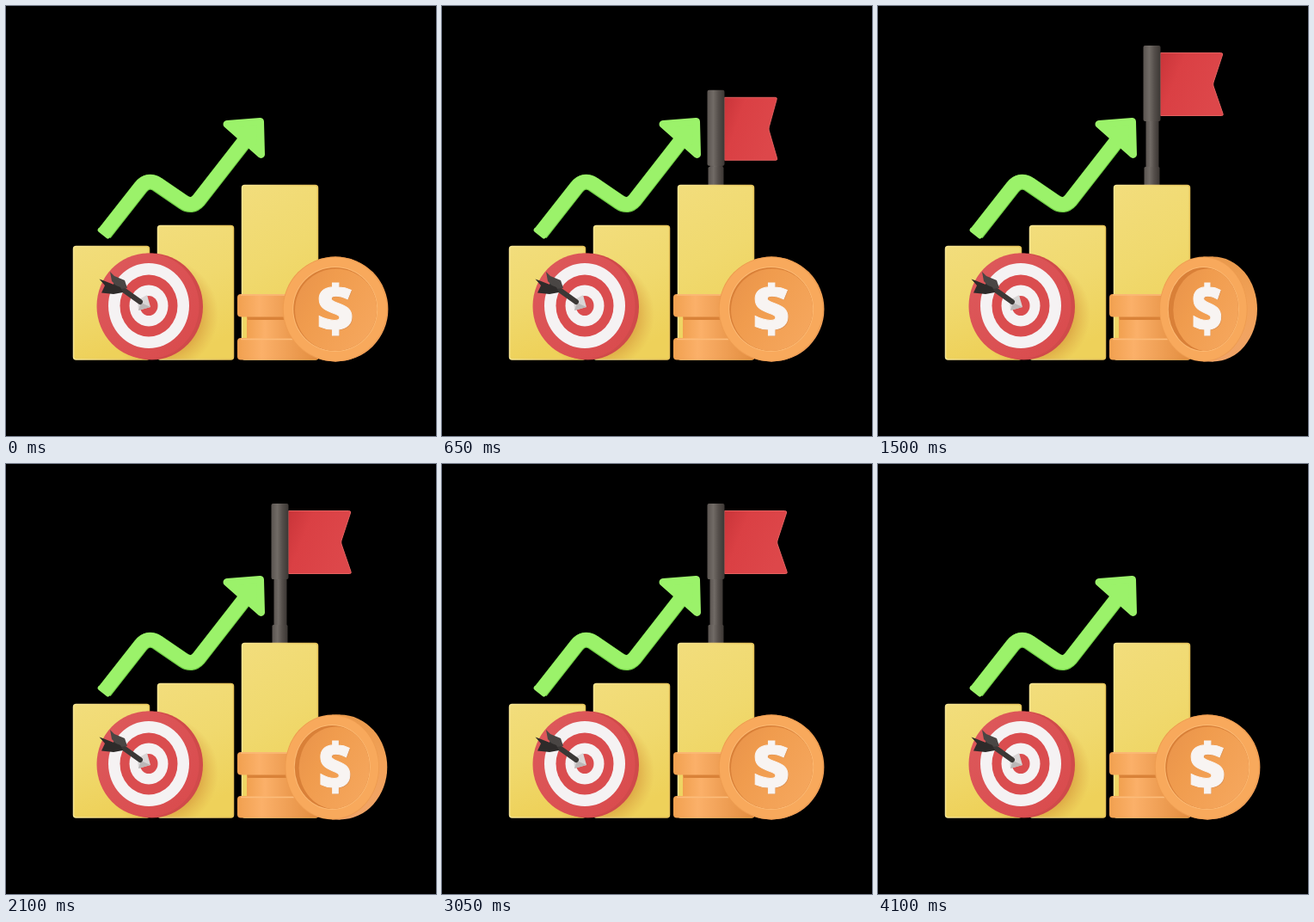
Write an HTML page that moves like this. It is 500x500 px and loops after 4150 ms.

```html
<!DOCTYPE html>
<html lang="en">
<head>
<meta charset="utf-8">
<title>Growth chart</title>
<style>
  html, body { margin: 0; width: 100%; height: 100%; overflow: hidden; background: #000; }
  svg { display: block; width: 100vw; height: 100vh; }
  text { font: 800 74px "Open Sans", "Noto Sans", sans-serif; text-anchor: middle; }
</style>
</head>
<body>
<svg viewBox="0 0 500 500">
  <defs>
    <linearGradient id="bar" x1="0" y1="0" x2=".25" y2="1">
      <stop offset="0" stop-color="#f2dd7c"/><stop offset=".5" stop-color="#f0d96e"/><stop offset="1" stop-color="#eed15a"/>
    </linearGradient>
    <linearGradient id="edge" x1="0" x2="1">
      <stop offset="0" stop-color="#f7e592"/><stop offset="1" stop-color="#e4c158"/>
    </linearGradient>
    <radialGradient id="shade">
      <stop offset=".6" stop-color="#cf8a32" stop-opacity=".75"/><stop offset="1" stop-color="#d9a040" stop-opacity="0"/>
    </radialGradient>
    <linearGradient id="pole" x1="0" x2="1">
      <stop offset="0" stop-color="#5a5450"/><stop offset=".35" stop-color="#716b66"/>
      <stop offset=".65" stop-color="#544e4a"/><stop offset="1" stop-color="#3c3734"/>
    </linearGradient>
    <linearGradient id="cloth" x1="0" x2="1" y2=".4">
      <stop offset="0" stop-color="#c93439"/><stop offset=".35" stop-color="#da4044"/><stop offset="1" stop-color="#dd474a"/>
    </linearGradient>
    <linearGradient id="stack" x1="0" x2="1">
      <stop offset="0" stop-color="#f1a04f"/><stop offset=".3" stop-color="#fbb069"/><stop offset="1" stop-color="#e28c3e"/>
    </linearGradient>
    <linearGradient id="side" x1="0" x2="0" y1="0" y2="1">
      <stop offset="0" stop-color="#e8994c"/><stop offset=".45" stop-color="#f3a258"/><stop offset="1" stop-color="#f0a468"/>
    </linearGradient>
    <linearGradient id="well" x1="0" x2="1" y2=".6">
      <stop offset="0" stop-color="#e8924a"/><stop offset=".4" stop-color="#f09c4e"/><stop offset="1" stop-color="#f5a65c"/>
    </linearGradient>
    <linearGradient id="red" x1="0" x2="1" y2="1">
      <stop offset="0" stop-color="#dd5a5c"/><stop offset="1" stop-color="#d94a4c"/>
    </linearGradient>
    <clipPath id="hole"><circle r="48.500"/></clipPath>
    <clipPath id="walls"><path d="M79 280H167V411H79ZM177 256H265V411H177Z"/></clipPath>
  </defs>

  <g id="mast">
    <rect id="middle" x="311.500" width="15" fill="url(#pole)"/>
    <rect id="base" x="309.500" width="18" rx="1.500" fill="url(#pole)"/>
    <g id="top">
      <path id="flag" d="M0 8.500H70Q73 8.500 72 11L61.500 43Q61 45 61.500 47L72.500 79Q73.500 81.500 71 81.500H0Z" fill="url(#cloth)" stroke="#e2605f"/>
      <rect x="308.500" width="20" height="88" rx="2" fill="url(#pole)"/>
    </g>
  </g>

  <g fill="url(#bar)" stroke="url(#edge)" stroke-width="1.500">
    <rect x="78.500" y="279.500" width="88" height="131.500" rx="3"/>
    <rect x="176.500" y="255.500" width="88" height="155.500" rx="3"/>
    <rect x="274.500" y="208.500" width="88" height="202.500" rx="3"/>
  </g>
  <ellipse cx="181" cy="359" rx="66" ry="66" fill="url(#shade)" clip-path="url(#walls)"/>

  <g stroke-linejoin="round" stroke-linecap="round">
    <path d="M114.500 264.500L156.500 211Q165 200.500 176 207.500L206 228Q216 235 224 226L277 158" fill="none" stroke="#70cf45" stroke-width="18" stroke-linecap="butt"/>
    <path d="M114 264.500L156.500 210.500Q165 200 176 207L206 227.500Q216 234.500 224 225.500L277 157.500" fill="none" stroke="#9bf26a" stroke-width="16.500" stroke-linecap="butt"/>
    <path d="M109 260.500L118.500 268" stroke="#9bf26a" stroke-width="5"/>
    <path d="M257 137.500L295.500 134.500L296.500 172.500Z" fill="#9bf26a" stroke="#9bf26a" stroke-width="9"/>
  </g>

  <g fill="url(#stack)">
    <rect x="280" y="359" width="70" height="30"/>
    <path d="M280 360H350V365H281Z" fill="#d98238"/>
    <rect x="269" y="335" width="85" height="26.500" rx="4"/>
    <rect x="269" y="386" width="95" height="25.500" rx="4"/>
    <path d="M273 336H340M273 387.500H340" stroke="#fcbc7a" stroke-width="1.500"/>
  </g>

  <g>
    <ellipse cx="169.500" cy="349.500" rx="59.500" ry="62" fill="#d04a4a"/>
    <ellipse cx="165" cy="349" rx="59.500" ry="61.500" fill="url(#red)"/>
    <g fill="#f5f2f3">
      <ellipse cx="166" cy="348.500" rx="47" ry="49.500"/>
      <ellipse cx="166" cy="348.500" rx="33.500" ry="36" fill="#da4d4f"/>
      <ellipse cx="166" cy="348.500" rx="22.500" ry="24"/>
      <ellipse cx="166" cy="348.500" rx="10.500" ry="11.500" fill="#da4d4f"/>
    </g>
    <path d="M153 342L164 336L168 350L154 354Z" fill="#d9d6d6"/>
    <path d="M157 345L168 350L154 354Z" fill="#bbb7b7"/>
    <path d="M128 324L156 344" stroke="#3b3836" stroke-width="6" stroke-linecap="round"/>
    <path d="M121 309L126 314L138 319L141 328L132 329L123 320Z" fill="#4a4644"/>
    <path d="M108.500 317.500L114 319.500L133 327L136 333L125 335L111 333.500L115 325Z" fill="#2e2b2a"/>
  </g>

  <g id="coin">
    <ellipse id="back" cy="352.500" ry="61" fill="url(#side)"/>
    <rect id="rim" y="291.500" height="122" fill="url(#side)"/>
    <g id="face">
      <circle r="61" fill="#ee9c50"/>
      <circle r="60" fill="#f8a95c"/>
      <circle r="49.500" fill="#fcb972"/>
      <circle r="48.500" fill="#d98038"/>
      <g clip-path="url(#hole)">
        <g id="floor">
          <circle cx="1" cy="1" r="48" fill="url(#well)"/>
          <text x="1" y="27" fill="#dd9355">$</text>
          <text y="26" fill="#f8f4f2" stroke="#f8f4f2">$</text>
        </g>
      </g>
    </g>
  </g>
</svg>
<script>
  const LOOP = 4150, STEP = 50;
  const el = id => document.getElementById(id);
  const set = (id, attrs) => {
    for (const key in attrs) el(id).setAttribute(key, attrs[key]);
  };
  // Sine ease-in-out from 0 to 1 between two times
  const ease = (t, from, to) => {
    const p = Math.min(1, Math.max(0, (t - from) / (to - from)));
    return (1 - Math.cos(Math.PI * p)) / 2;
  };
  const pulse = (t, a, b, c, d) => ease(t, a, b) - ease(t, c, d);

  function drawFlag(t) {
    const y = 210 - 164 * pulse(t, 185, 935, 3100, 3850);
    const open = pulse(t, 354, 754, 3225, 3625);
    const baseTop = Math.min(208, Math.max(187, y));
    set("top", { transform: `translate(0 ${y})` });
    set("flag", { transform: `translate(328.500 0) scale(${open} 1)` });
    set("middle", { y: Math.min(y + 80, 210), height: Math.max(0, 130 - y) });
    set("base", { y: baseTop, height: 212 - baseTop });
  }

  function drawCoin(t) {
    const angle = (2 + 31 * pulse(t, 600, 1400, 1850, 2650)) * Math.PI / 180;
    const squash = Math.cos(angle);
    const depth = 21 * Math.sin(angle);
    const center = 383 + Math.sin(angle) * 2;
    const front = center - depth / 2;
    set("back", { cx: center + depth / 2, rx: 61 * squash });
    set("rim", { x: front, width: depth });
    set("face", { transform: `translate(${front} 352.500) scale(${squash} 1)` });
    // The recessed floor lags behind the face as the coin turns
    set("floor", { transform: `translate(${8 * Math.tan(angle)} 0)` });
  }

  function draw() {
    const t = Math.floor(performance.now() % LOOP / STEP) * STEP;
    drawFlag(t);
    drawCoin(t);
    requestAnimationFrame(draw);
  }
  draw();
</script>
</body>
</html>
```
